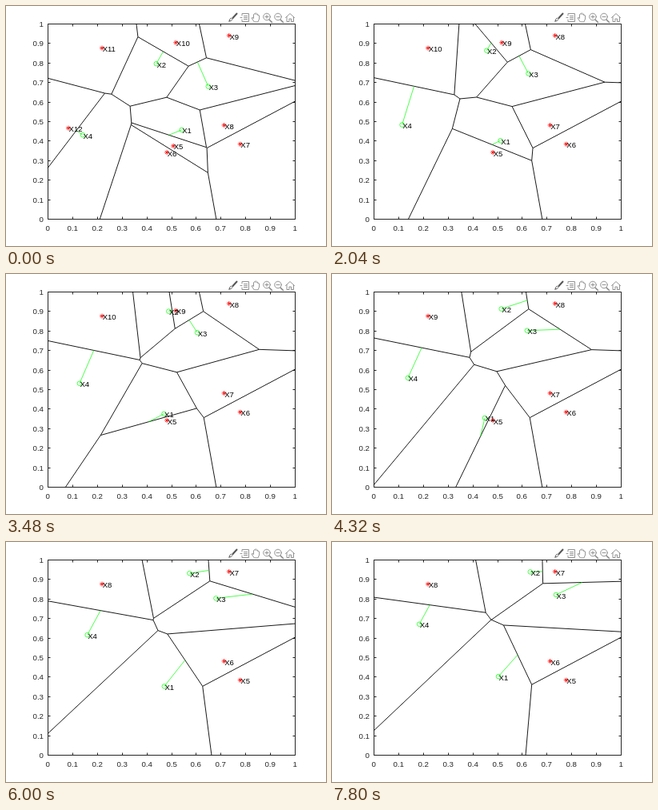
An HTML page for the animation above (8 s loop, 400 by 300 pixels).

```html
<!DOCTYPE html>
<html lang="en">
<head>
<meta charset="utf-8">
<title>Voronoi pursuit</title>
<style>
  html, body { margin: 0; width: 100%; height: 100%; overflow: hidden; background: #fff; }
  svg { display: block; width: 400px; height: 300px; font: 9.5px "Liberation Sans", Arial, sans-serif; }
  path, circle { fill: none; }
  .axes { stroke: #262626; }
  .ticks { fill: #262626; font-size: 9.7px; }
  .edges { stroke: #000; stroke-width: .9; }
  .chase { stroke: #0f0; stroke-width: .7; }
  .prey { stroke: #f00; stroke-width: .8; }
  .tools { stroke: #888; stroke-width: .9; stroke-linejoin: round; stroke-linecap: round; }
</style>
</head>
<body>
<svg viewBox="0 0 400 300">
  <g class="tools">
    <path d="M288.5 9.5L283.5 15" stroke="#555" stroke-width="2"/>
    <path d="M279 19q3 .3 4-2.5l-1.5-1.5q-2 .5-2.5 4z" fill="#555" stroke="#555"/>
    <path d="M295 12V9.500h8.500v10H295V17M297.500 12.500h4M297.500 14.500h4M297.500 16.500h4M293 14.500h2"/>
    <path d="M310 19.500l-3-4.500q.5-1.500 2.500 .5v-5q1-1.500 1.800 0v-1q1-1.500 1.800 0v1q1-1 1.800 0v1.500q1-1 1.700 0v4l-1.500 3.500z"/>
    <path d="M329 17l3.500 3.500M343 17l3.500 3.500" stroke-width="1.5"/>
    <circle cx="326" cy="13.500" r="4.300"/><circle cx="340" cy="13.500" r="4.300"/>
    <path d="M324 13.500h4M326 11.500v4M338 13.500h4"/>
    <path d="M349.500 14.500l5.500-5 5.500 5M351 13.500v6h3v-3.500h2.500v3.500h3v-6"/>
  </g>
  <path class="axes" id="axes"/>
  <g class="ticks" id="ticks"></g>
  <path class="edges" id="edges"/>
  <path class="prey" id="prey"/>
  <path class="chase" id="chase"/>
  <g id="labels"></g>
</svg>
<script>
const LOOP = 8000, STEPS = 27, SPEED = .01;
const el = id => document.getElementById(id);

// Start positions in the unit square; caught is the step at which an evader leaves.
const pursuers = [
  { x: .541, y: .457 }, { x: .438, y: .795 }, { x: .648, y: .679 }, { x: .141, y: .431 }
];
const evaders = [
  { x: .507, y: .375, caught: 6 }, { x: .481, y: .342, caught: 18 },
  { x: .777, y: .384 }, { x: .712, y: .481 }, { x: .732, y: .939 },
  { x: .517, y: .903, caught: 13 }, { x: .219, y: .875 }, { x: .083, y: .466, caught: 4 }
];

const stepStart = n => n ? 120 * Math.floor(2.42 * n + .14) : 0;
const mix = (a, b, k) => a + (b - a) * k;
const between = (p, q, k) => ({ x: mix(p.x, q.x, k), y: mix(p.y, q.y, k) });
const dist = (p, q) => Math.hypot(p.x - q.x, p.y - q.y);

// Keep the part nearer to a than to b; each vertex stores the neighbour across its outgoing edge.
function clip(poly, a, b, id) {
  const side = p => dist(p, b) ** 2 - dist(p, a) ** 2;
  const out = [];
  poly.forEach((p, i) => {
    const q = poly[(i + 1) % poly.length], sp = side(p), sq = side(q);
    if (sp >= 0) out.push(p);
    if (sp >= 0 !== sq >= 0) {
      out.push({ ...between(p, q, sp / (sp - sq)), id: sp >= 0 ? id : p.id });
    }
  });
  return out;
}

function cellEdges(sites, i) {
  let poly = [[0, 0], [1, 0], [1, 1], [0, 1]].map(([x, y]) => ({ x, y, id: -1 }));
  sites.forEach((s, j) => { if (j !== i) poly = clip(poly, sites[i], s, j); });
  return poly.map((a, k) => ({ a, b: poly[(k + 1) % poly.length], id: a.id }))
    .filter(e => e.id >= 0);
}

// A pursuer heads for the nearest midpoint of an edge shared with an evader.
function goalOf(site, cell, hunterCount) {
  return cell.filter(e => e.id >= hunterCount)
    .map(e => between(e.a, e.b, .5))
    .sort((p, q) => dist(p, site) - dist(q, site))[0] || site;
}

function simulate() {
  const scenes = [];
  let hunters = pursuers;
  for (let step = 0; step <= STEPS; step++) {
    const prey = evaders.filter(e => !(step >= e.caught));
    const sites = [...hunters, ...prey];
    const cells = sites.map((_, i) => cellEdges(sites, i));
    const goals = hunters.map((h, i) => goalOf(h, cells[i], hunters.length));
    scenes.push({ hunters, prey, sites, cells, goals });
    hunters = hunters.map((h, i) => between(h, goals[i], SPEED / Math.max(SPEED, dist(h, goals[i]))));
  }
  return scenes;
}

// Unit square to stage pixels
const toX = x => 52.3 + 309.4 * x;
const toY = y => 266.6 - 244.6 * y;
const num = v => v.toFixed(2);
const line = (p, q) => `M${num(toX(p.x))} ${num(toY(p.y))}L${num(toX(q.x))} ${num(toY(q.y))}`;
const circle = p => `M${num(toX(p.x) - 2.8)} ${num(toY(p.y))}a2.8 2.8 0 1 0 5.6 0a2.8 2.8 0 1 0 -5.6 0`;
const star = p => [0, 1, 2, 3].map(k => {
  const dx = 3 * Math.cos(k * Math.PI / 4), dy = 3 * Math.sin(k * Math.PI / 4);
  return `M${num(toX(p.x) - dx)} ${num(toY(p.y) - dy)}l${num(2 * dx)} ${num(2 * dy)}`;
}).join('');
const text = (x, y, str, anchor = 'start') =>
  `<text x="${num(x)}" y="${num(y)}" text-anchor="${anchor}">${str}</text>`;

function draw({ hunters, prey, sites, cells, goals }) {
  const edges = cells.flatMap((cell, i) => cell.filter(e => e.id > i).map(e => line(e.a, e.b)));
  el('edges').setAttribute('d', edges.join(''));
  el('chase').setAttribute('d', hunters.map((h, i) => circle(h) + line(h, goals[i])).join(''));
  el('prey').setAttribute('d', prey.map(star).join(''));
  el('labels').innerHTML = sites.map((s, i) => text(toX(s.x) + .6, toY(s.y) + 4.6, 'X' + (i + 1))).join('');
}

function drawAxes() {
  const l = 52.5, r = 361.5, t = 22.5, b = 266.5;
  let d = `M${l} ${t}H${r}V${b}H${l}Z`, labels = '';
  for (let i = 0; i <= 10; i++) {
    const x = Math.floor(mix(l, r, i / 10)) + .5, y = Math.floor(mix(b, t, i / 10)) + .5;
    d += `M${x} ${b}v-3M${x} ${t}v3M${l} ${y}h3M${r} ${y}h-3`;
    labels += text(x - .3, 280.5, i / 10, 'middle') + text(47, y + 3.9, i / 10, 'end');
  }
  el('axes').setAttribute('d', d);
  el('ticks').innerHTML = labels;
}

const scenes = simulate();
let shown = -1;
function tick() {
  const t = performance.now() % LOOP;
  let step = 0;
  while (step < STEPS && stepStart(step + 1) <= t) step++;
  if (step !== shown) draw(scenes[shown = step]);
  requestAnimationFrame(tick);
}

drawAxes();
tick();
</script>
</body>
</html>
```
